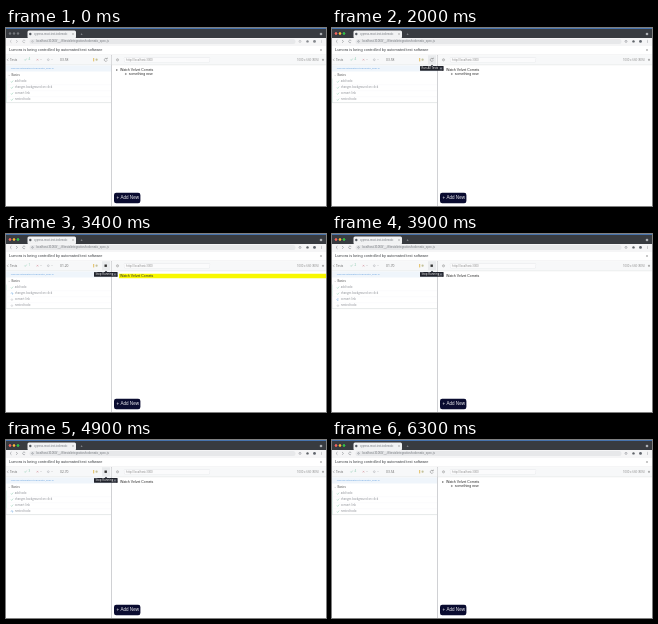
Write an HTML page with a canvas that moves like this. It is 320 px wide and 178 px high and loops after 8000 ms.

```html
<!DOCTYPE html>
<html lang="en">
<head>
<meta charset="utf-8">
<title>Test run</title>
<style>
html, body { margin: 0; width: 320px; height: 178px; overflow: hidden; background: #fff }
canvas { display: block; width: 320px; height: 178px }
</style>
</head>
<body>
<canvas id="stage"></canvas>
<script>
const canvas = document.getElementById('stage');
const c = canvas.getContext('2d');
const scale = devicePixelRatio || 1;
canvas.width = 320 * scale;
canvas.height = 178 * scale;

const LOOP = 8000, RUN = 2200, DONE = 5700;
const TODO = 'Watch Velvet Comets', CHILD = 'something new';
const tests = ['add todo', 'changes background on click', 'convert link', 'nested todo'];
const starts = [2200, 3000, 3600, 4600, DONE];
const GREEN = '#7fc4a6', GREY = '#a4a6ac', BLUE = '#5b9bdd';
const SANS = '"Open Sans", sans-serif', ARIAL = '"Liberation Sans", sans-serif';

function rect(x, y, w, h, color, r = 0) {
  c.fillStyle = color;
  c.beginPath();
  c.roundRect(x, y, w, h, r);
  c.fill();
}

function dot(x, y, r, color) {
  c.fillStyle = color;
  c.beginPath();
  c.arc(x, y, r, 0, 7);
  c.fill();
}

function ring(x, y, r, color, from = 0, to = 7) {
  c.strokeStyle = color;
  c.lineWidth = .5;
  c.beginPath();
  c.arc(x, y, r, from, to);
  c.stroke();
}

function line(color, width, ...points) {
  c.strokeStyle = color;
  c.lineWidth = width;
  c.beginPath();
  for (let i = 0; i < points.length; i += 2) c.lineTo(points[i], points[i + 1]);
  c.stroke();
}

function text(s, x, y, size, color, font = SANS) {
  c.font = `${size}px ${font}`;
  c.fillStyle = color;
  c.textBaseline = 'middle';
  c.fillText(s, x, y);
}

const tick = (x, y) => line(GREEN, .5, x - 1, y, x - .3, y + .8, x + 1.2, y - 1);
function cross(x, y, r, color) {
  line(color, .5, x - r, y - r, x + r, y + r);
  line(color, .5, x + r, y - r, x - r, y + r);
}

function browser(t) {
  const focus = t < 1300 ? 0 : t < 1400 ? .5 : 1;
  rect(0, 0, 320, 10, '#383b40');
  rect(0, 0, 320, 1, '#4773ad');
  rect(21.5, 2.5, 48.5, 8, '#f1f2f3', 1.5);
  ['#ff5f57', '#febc2e', '#28c840'].forEach((color, i) => {
    dot(4 + i * 4, 5.5, 1.2, '#73767b');
    c.globalAlpha = focus;
    dot(4 + i * 4, 5.5, 1.2, color);
    c.globalAlpha = 1;
  });
  dot(24.3, 6, 1.2, '#555a61');
  text('cypress-react-text-todomatic', 28, 6.1, 2.65, '#777b80', ARIAL);
  cross(67, 6, .6, '#777');
  text('+', 74.6, 6, 4, '#c9ccd0', ARIAL);
  dot(315, 6, 1.3, '#aeb1b5');

  rect(0, 10, 320, 8, '#f5f5f6');
  const ink = focus ? '#777b80' : '#a0a3a7';
  line(ink, .5, 5.5, 12, 4, 13.4, 5.5, 14.8);
  line(ink, .5, 10, 12, 11.5, 13.4, 10, 14.8);
  ring(18, 13.4, 1.3, ink, .6, 6);
  rect(23.5, 11, 266, 5, '#e7e8ea', 2.5);
  ring(26.5, 13.4, .8, ink);
  text('localhost:31060/__/#/tests/integration/todomatic_spec.js', 30, 13.5, 2.95, '#787c81', ARIAL);
  ring(294, 13.4, 1, ink);
  dot(301.5, 13.4, 1.2, focus ? '#5f6368' : '#85888d');
  dot(308.5, 13.4, 1.4, focus ? '#60656c' : '#85888d');
  for (let i = 0; i < 3; i++) dot(315.5, 12.2 + i * 1.2, .35, ink);

  rect(0, 18, 320, 9, '#fff');
  text('Lumora is being controlled by automated test software', 3, 22, 3.9, '#3c3f43', ARIAL);
  cross(315, 22, .8, '#777');
  line('#d4d6d9', .5, 0, 27, 320, 27);
}

function reporter(t, running, passed) {
  rect(0, 27.3, 105, 150.7, '#fff');
  rect(0, 27.3, 105, 9.5, '#f7f8f9');
  line('#dddfe1', .5, 0, 36.8, 105, 36.8);
  line('#888', .5, 2.4, 30.6, 1.2, 31.8, 2.4, 33);
  text('Tests', 4, 31.7, 3.1, '#666');
  tick(19.5, 31.6);
  text(passed || '--', 22.5, 31.7, 3, GREEN);
  cross(31.5, 31.7, .8, '#d08a94');
  text('--', 34, 31.7, 3, '#888');
  ring(42.3, 31.7, .9, GREY);
  text('--', 45, 31.7, 3, '#999');

  const elapsed = running ? (Math.floor(t / 100) * 100 - RUN) / 1000 : t < RUN ? 3.58 : 3.54;
  text(elapsed.toFixed(2).padStart(5, '0'), 54, 31.7, 3.3, '#666');
  line('#e0b64a', .9, 87.7, 30, 87.7, 33.4);
  dot(90.6, 31.7, 1.1, '#c3c19a');

  if (t >= 1600 && t < 6300) rect(96, 27.3, 8, 9.2, '#e9ebed');
  if (running) rect(98.5, 30.5, 2.4, 2.4, '#333');
  else {
    ring(99.8, 31.8, 1.5, '#777', .4, 5.4);
    line('#777', .5, 101.4, 29.7, 101.2, 31, 99.9, 30.8);
  }

  rect(0, 37.5, 105, 6, '#eff5fb');
  text('cypress/integration/todomatic_spec.js', 4.7, 40.6, 2.45, BLUE);
  line('#999', .4, 2.6, 46.9, 3.2, 47.6, 3.8, 46.9);
  text('Basics', 5.5, 47.4, 2.9, '#444');

  tests.forEach((name, i) => {
    const y = 53.6 + i * 6;
    const done = i < passed, active = running && i === passed;
    rect(0, y - 3, .5, 6, done ? '#c8e5d9' : '#e3e5e7');
    if (done) tick(5.9, y);
    else if (active) ring(5.9, y, .9, BLUE, t / 120, t / 120 + 4.5);
    else ring(5.9, y, .8, '#bbbdc2');
    text(name, 8.7, y, 2.8, '#888b92');
    if (i < 3) line('#f0f1f3', .3, 1, y + 3, 105, y + 3);
  });
  line('#d3dbdb', .6, 0, 74.6, 105, 74.6);
  rect(105, 27, .8, 151, '#b5b7bb');
}

function page(t, running, current) {
  rect(105.8, 27.3, 214.2, 150.7, '#fff');
  rect(105.8, 27.3, 214.2, 9.5, '#f7f8f9');
  line('#dddfe1', .5, 105.8, 36.8, 320, 36.8);
  ring(111.5, 31.8, 1.1, '#888');
  dot(111.5, 31.8, .4, '#888');
  rect(118, 29.4, 86, 4.8, '#dfe1e4', .8);
  rect(118.3, 29.7, 85.4, 4.2, '#fbfbfc', .6);
  text('http://localhost:3000', 120, 31.8, 2.75, '#888');
  text('1000 x 660 (80%)', 291, 31.8, 2.8, '#888');
  dot(317, 31.8, 1.1, '#aaa');

  const age = running ? t - starts[current] : Infinity;
  if (age < 100) return;
  const typed = TODO.slice(0, Math.max(0, age - 190) / 5);
  const child = !running ? CHILD : current < 3 ? '' : CHILD.slice(0, Math.max(0, t - 5300) / 20);
  if (running && current === 1 && t >= 3400) rect(113, 39.8, 207, 4.4, '#f8f800');
  if (typed) {
    dot(110.8, 42, .65, '#333');
    text(typed, 114, 42.1, 3.5, '#2b2b2b', ARIAL);
  }
  if (child) {
    ring(119.8, 46, .55, '#333');
    text(child, 122.8, 46, 3.55, '#2b2b2b', ARIAL);
  }
  rect(108, 164.8, 26.4, 10.4, '#0a0c30', 2.2);
  text('+ Add New', 110.6, 170.1, 4.55, '#f1f1f5', ARIAL);
}

function tooltip(running) {
  rect(88, 37.9, 23.6, 4.9, '#20232c', .6);
  c.beginPath();
  c.moveTo(98.8, 38);
  c.lineTo(100, 36.8);
  c.lineTo(101.2, 38);
  c.fill();
  text(running ? 'Stop Running' : 'Run All Tests', 89.5, 40.4, 2.85, '#fff');
  rect(107.7, 39, 2.6, 2.8, '#4b505b', .4);
  text(running ? 'S' : 'R', 108.3, 40.4, 2.3, '#fff');
}

function draw(now) {
  const t = now % LOOP;
  const running = t >= RUN && t < DONE;
  const current = running ? starts.findLastIndex(s => t >= s) : 4;
  c.setTransform(scale, 0, 0, scale, 0, 0);
  c.clearRect(0, 0, 320, 178);
  browser(t);
  reporter(t, running, current);
  page(t, running, current);
  if (t >= 1600 && t < 6300) tooltip(running);
  requestAnimationFrame(draw);
}
requestAnimationFrame(draw);
</script>
</body>
</html>
```
